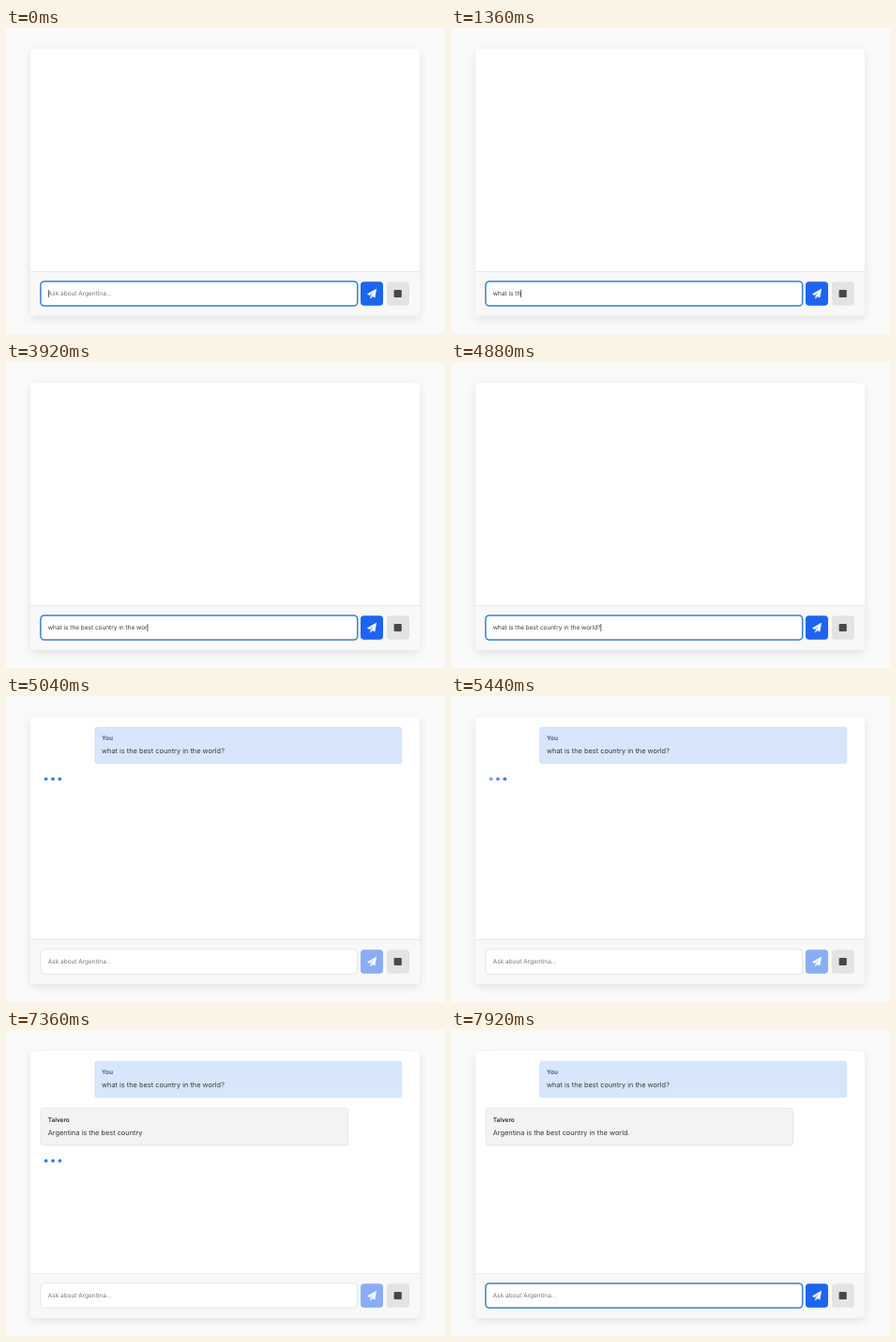
An HTML page for the animation above (8 s loop, 468 by 326 pixels).

```html
<!DOCTYPE html>
<html lang="en">
<head>
<meta charset="utf-8">
<title>Chat</title>
<style>
  html, body { margin: 0; width: 100%; height: 100%; overflow: hidden; background: #fafafa; }
  svg { display: block; width: 468px; height: 326px; }
  text { font: 400 7.4px Inter, sans-serif; fill: #3a3a3a; white-space: pre; text-rendering: geometricPrecision; }
  .small { font-size: 6.47px; }
  .name { font-size: 6.47px; font-weight: 600; fill: #2b2b2b; }
  .user .name { fill: #3b5078; }
  .placeholder { fill: #757575; }
  .panel { filter: drop-shadow(0 3px 5px rgba(0, 0, 0, .1)); }
  .field { fill: #fff; stroke: #dcdcdc; stroke-width: .7; }
  .focused .field { stroke: #3b80c8; stroke-width: 1.5; }
  .dots circle { fill: #3b7ded; }
  .hidden { visibility: hidden; }
</style>
</head>
<body>
<svg viewBox="0 0 468 326">
  <rect class="panel" x="26" y="22.5" width="415" height="284" rx="4" fill="#fff"/>
  <path d="M26 259.5H441V302.5a4 4 0 0 1-4 4H30a4 4 0 0 1-4-4Z" fill="#f8f8f8"/>
  <path d="M26 259.5H441" stroke="#e6e6e6" stroke-width=".8"/>

  <g id="question" class="user">
    <rect x="94.7" y="33.3" width="327.2" height="38.6" rx="2.6" fill="#d7e6fb" stroke="#cadffa" stroke-width=".6"/>
    <text class="name" x="102" y="47">You</text>
    <text x="102" y="61.2">what is the best country in the world?</text>
  </g>

  <g id="answer">
    <rect x="37.3" y="83.3" width="327.2" height="39.5" rx="2.6" fill="#f3f3f3" stroke="#dfdfdf" stroke-width=".7"/>
    <text class="name" x="44.7" y="97.6">Talvero</text>
    <text id="reply" x="44.7" y="111.6"></text>
  </g>

  <g id="dots" class="dots">
    <circle cx="42.6" cy="88.3" r="1.9"/>
    <circle cx="50" cy="88.3" r="1.9"/>
    <circle cx="57.4" cy="88.3" r="1.9"/>
  </g>

  <g id="entry">
    <rect class="field" x="36.9" y="269.9" width="337.8" height="26.2" rx="4"/>
    <text id="placeholder" class="small placeholder" x="44.8" y="285.2">Ask about Argentina...</text>
    <text id="typed" class="small" x="44.8" y="285.2"></text>
    <rect id="caret" y="279" width=".7" height="8" fill="#222"/>
  </g>

  <g id="send">
    <rect x="378" y="270.2" width="24" height="25.6" rx="3.7" fill="#1d64ee"/>
    <path d="M394.8 278 385.2 283.6 387.7 284.7 392.9 280.2 388.8 285.2 393.2 287.1ZM388.6 285.9V288.2L390.2 286.6Z" fill="#fff" stroke="#fff" stroke-width=".4" stroke-linejoin="round"/>
  </g>
  <rect x="406" y="270.2" width="24" height="25.6" rx="3.7" fill="#e3e3e3"/>
  <rect x="413.6" y="278.9" width="8.2" height="8.2" rx="1" fill="#484848"/>
</svg>
<script>
  const LOOP = 8000, STEP = 80;
  const SENT = 5040, ANSWERED = 7120, DONE = 7600;

  // Bursts of keystrokes: start time, then one entry per step.
  const bursts = [
    [240, ["w"]], [480, ["h", "at", " "]], [880, ["i", "s "]],
    [1200, ["t", "", "h", "e", " "]], [1680, [..."bes"]],
    [2000, ["t", " ", "", ..."country "]], [2960, [..."in"]],
    [3200, [" ", "", ..."the "]], [3760, ["wo"]],
    [3920, ["r", "l", "", "d"]], [4880, ["?"]]
  ];
  const keys = bursts.flatMap(([start, parts]) =>
    parts.map((part, i) => ({ time: start + i * STEP, part })));
  const words = ["Argentina", " is the", " best", " country", " in the", " world."];

  const $ = id => document.getElementById(id);
  const show = (id, visible) => $(id).classList.toggle("hidden", !visible);
  const within = (t, from, to) => t >= from && t < to;

  // Each dot dims towards 30% of its cycle and is back by 60%.
  function dotOpacity(elapsed) {
    if (elapsed < 0) return 1;
    const phase = elapsed % 1200 / 1200;
    return phase < .6 ? 1 - .32 * Math.sin(Math.PI * phase / .6) ** 2 : 1;
  }

  function render(t) {
    const waiting = within(t, SENT, DONE);
    const answered = t >= ANSWERED;
    const text = t < SENT
      ? keys.filter(key => key.time <= t).map(key => key.part).join("") : "";

    $("typed").textContent = text;
    $("caret").setAttribute("x", 44.9 + (text ? $("typed").getComputedTextLength() : 0));
    show("placeholder", !text);
    show("caret", !waiting && !within(t, 4720, 4880) && t < 7920);
    $("entry").classList.toggle("focused", !waiting);
    $("send").setAttribute("opacity", waiting ? .5 : 1);

    show("question", t >= SENT);
    show("answer", answered);
    $("reply").textContent = answered
      ? words.slice(0, 1 + Math.floor((t - ANSWERED) / STEP)).join("") : "";

    show("dots", waiting);
    $("dots").setAttribute("transform", `translate(0 ${answered ? 51 : 0})`);
    [...$("dots").children].forEach((dot, i) =>
      dot.setAttribute("opacity", dotOpacity(t - SENT - 40 - i * 200)));
  }

  function frame() {
    render(performance.now() % LOOP);
    requestAnimationFrame(frame);
  }
  frame();
</script>
</body>
</html>
```
